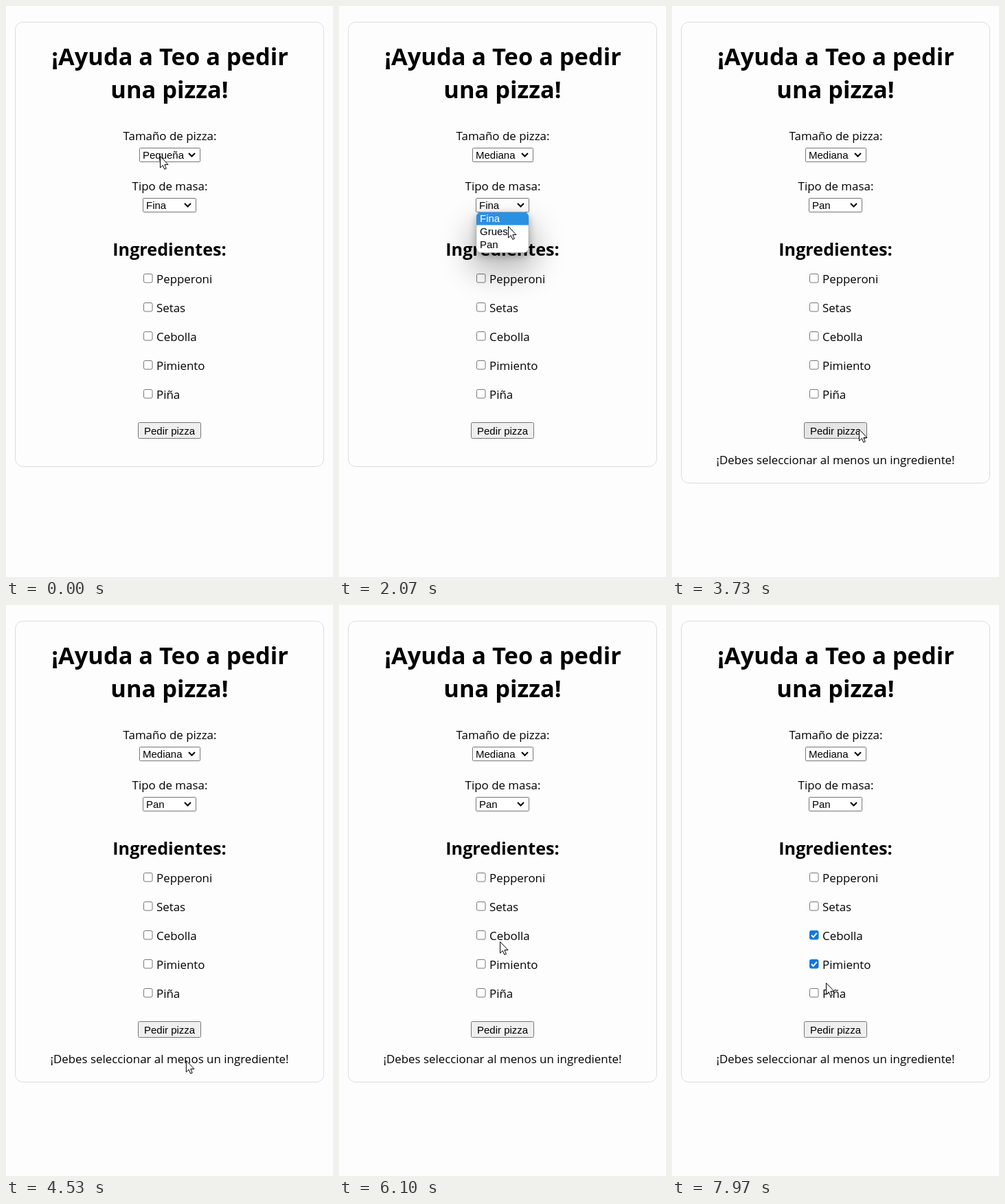
An HTML page that plays this animation: 476 px wide and 830 px high, repeating every 8 s.

```html
<!DOCTYPE html>
<html lang="es">
<head>
<meta charset="utf-8">
<title>Pedir pizza</title>
<style>
  html, body { margin: 0; width: 100%; height: 100%; overflow: hidden; background: #fdfdfd; }
  svg { display: block; width: 476px; height: 830px; }
  text { font-family: "Open Sans", "Noto Sans", sans-serif; font-size: 16.9px; fill: #000; }
  .mid { text-anchor: middle; }
  .title { font-size: 34.4px; font-weight: 700; }
  .subtitle { font-size: 25.2px; font-weight: 700; }
  .control { font-family: "Liberation Sans", Arial, sans-serif; font-size: 15px; }
  .field { fill: #fff; stroke: #767676; }
  .chevron { fill: none; stroke: #000; stroke-width: 2; }
  .box { fill: #fff; stroke: #767676; }
  .checked .box { fill: #1177dd; stroke: #1177dd; }
  .tick { fill: none; stroke: #fff; stroke-width: 2; visibility: hidden; }
  .checked .tick { visibility: visible; }
  .glow { fill: #000; opacity: .26; filter: blur(22px); }
  .shade { fill: #000; opacity: .3; filter: blur(6px); }
</style>
</head>
<body>
<svg id="stage" viewBox="0 0 476 830">
  <rect id="card" x="13.5" y="23.5" width="449" height="646" rx="11" fill="none" stroke="#dcdce0"/>
  <text class="mid title" x="238.5" y="86">¡Ayuda a Teo a pedir</text>
  <text class="mid title" x="238" y="134">una pizza!</text>
  <text class="mid" x="238.5" y="195">Tamaño de pizza:</text>
  <text class="mid" x="238.5" y="268">Tipo de masa:</text>
  <text class="mid subtitle" x="238" y="363">Ingredientes:</text>
  <g id="form"></g>
  <rect id="button" x="192.5" y="605.5" width="91" height="23" rx="2" stroke="#767676"/>
  <text class="control" x="201" y="623">Pedir pizza</text>
  <text id="message" class="mid" x="238" y="666">¡Debes seleccionar al menos un ingrediente!</text>
  <g id="popups"></g>
  <path id="cursor" d="M0 0V16.5L3.8 13L6.3 18.8L8.8 17.7L6.4 12H11.5Z" fill="#fff" stroke="#000"/>
</svg>
<script>
const LOOP = 8000;

// [ms, x, y] of the pointer tip
const pointer = [
  [0, 224, 218], [600, 224, 218], [900, 226, 229], [1270, 228, 255], [1450, 229, 256],
  [1780, 239, 289], [1900, 241, 291], [2070, 246, 320], [2420, 238, 341], [2700, 237, 347],
  [3300, 268, 612], [3730, 272, 615], [4150, 272, 615], [4500, 262, 662], [4700, 260, 660],
  [5270, 236, 490], [6200, 234, 489], [6900, 202, 485], [7150, 203, 483],
  [7420, 204, 522], [7600, 205, 524], [7970, 224, 549]
];

const menus = [
  { x: 194, y: 206, w: 89, items: ["Pequeña", "Mediana", "Grande"],
    open: 500, close: 1430, pick: 1, hover: [[500, 0], [1130, 1]] },
  { x: 199, y: 279, w: 78, items: ["Fina", "Gruesa", "Pan"],
    open: 1870, close: 2700, pick: 2, hover: [[1870, 0], [2100, 1], [2420, 2]] }
];

const toppings = [
  ["Pepperoni"], ["Setas"], ["Cebolla", 7030], ["Pimiento", 7480], ["Piña"]
];

const SUBMIT = 3450;
const $ = id => document.getElementById(id);

function add(parent, tag, attrs, content = "") {
  const node = document.createElementNS("http://www.w3.org/2000/svg", tag);
  for (const key in attrs) node.setAttribute(key, attrs[key]);
  node.textContent = content;
  parent.append(node);
  return node;
}

function buildMenu(menu, index) {
  const { x, y, w, items } = menu;
  add($("form"), "rect", { class: "field", x: x + .5, y: y + .5, width: w - 1, height: 20, rx: 1 });
  menu.value = add($("form"), "text", { class: "control", x: x + 5, y: y + 16 });
  add($("form"), "path", { class: "chevron", d: `M${x + w - 17} ${y + 8}l4.5 4.5l4.5 -4.5` });

  const top = y + 20.5, left = x + 1, width = w - 2, height = 59;
  const shape = { x: left, y: top, width, height, rx: 7 };
  menu.popup = add($("popups"), "g", {});
  add(menu.popup, "rect", { ...shape, class: "glow", x: left - 8, y: top + 18, width: width + 16, height: height + 10 });
  add(menu.popup, "rect", { ...shape, class: "shade", y: top + 4 });
  add(menu.popup, "rect", { ...shape, fill: "#fff", stroke: "#b4b4b4", "stroke-width": .7 });
  const clip = add(menu.popup, "clipPath", { id: "clip" + index });
  add(clip, "rect", shape);
  const list = add(menu.popup, "g", { "clip-path": `url(#clip${index})` });
  menu.bar = add(list, "rect", { x: left, width, height: 19, fill: "#2a90e2" });
  menu.options = items.map((label, i) =>
    add(list, "text", { class: "control", x: x + 6, y: top + 14.5 + 19 * i }, label));
}

function buildTopping([label, checkedAt], i) {
  const y = 390 + 42 * i;
  const group = add($("form"), "g", {});
  add(group, "rect", { class: "box", x: 200.5, y: y - .5, width: 12.5, height: 12.5, rx: 2 });
  add(group, "path", { class: "tick", d: `M203 ${y + 6}l2.7 2.8l5 -6` });
  add($("form"), "text", { x: 219, y: y + 13 }, label);
  return { group, checkedAt };
}

const show = (node, on) => node.style.visibility = on ? "visible" : "hidden";
const ease = p => p * p * (3 - 2 * p);

function pointerAt(t) {
  const next = pointer.findIndex(step => step[0] > t);
  if (next < 0) return pointer.at(-1).slice(1);
  const [t0, x0, y0] = pointer[next - 1], [t1, x1, y1] = pointer[next];
  const p = ease((t - t0) / (t1 - t0));
  return [x0 + (x1 - x0) * p, y0 + (y1 - y0) * p];
}

function drawMenu(menu, t) {
  menu.value.textContent = menu.items[t >= menu.close ? menu.pick : 0];
  show(menu.popup, t >= menu.open && t < menu.close);
  const active = menu.hover.reduce((row, [at, i]) => t >= at ? i : row, 0);
  menu.bar.setAttribute("y", menu.y + 20.5 + 19 * active);
  menu.options.forEach((node, i) => node.style.fill = i === active ? "#fff" : "#000");
}

function draw(t) {
  const [x, y] = pointerAt(t);
  $("cursor").setAttribute("transform", `translate(${x + .5} ${y + .5})`);
  menus.forEach(menu => drawMenu(menu, t));
  boxes.forEach(({ group, checkedAt }) => group.classList.toggle("checked", t >= checkedAt));
  const sent = t >= SUBMIT;
  show($("message"), sent);
  $("card").setAttribute("height", sent ? 670 : 646);
  const over = x > 192 && x < 284 && y > 605 && y < 629;
  $("button").setAttribute("fill", over ? "#e5e5e5" : "#efefef");
}

menus.forEach(buildMenu);
const boxes = toppings.map(buildTopping);

function tick() {
  draw(performance.now() % LOOP);
  requestAnimationFrame(tick);
}
tick();
</script>
</body>
</html>
```
